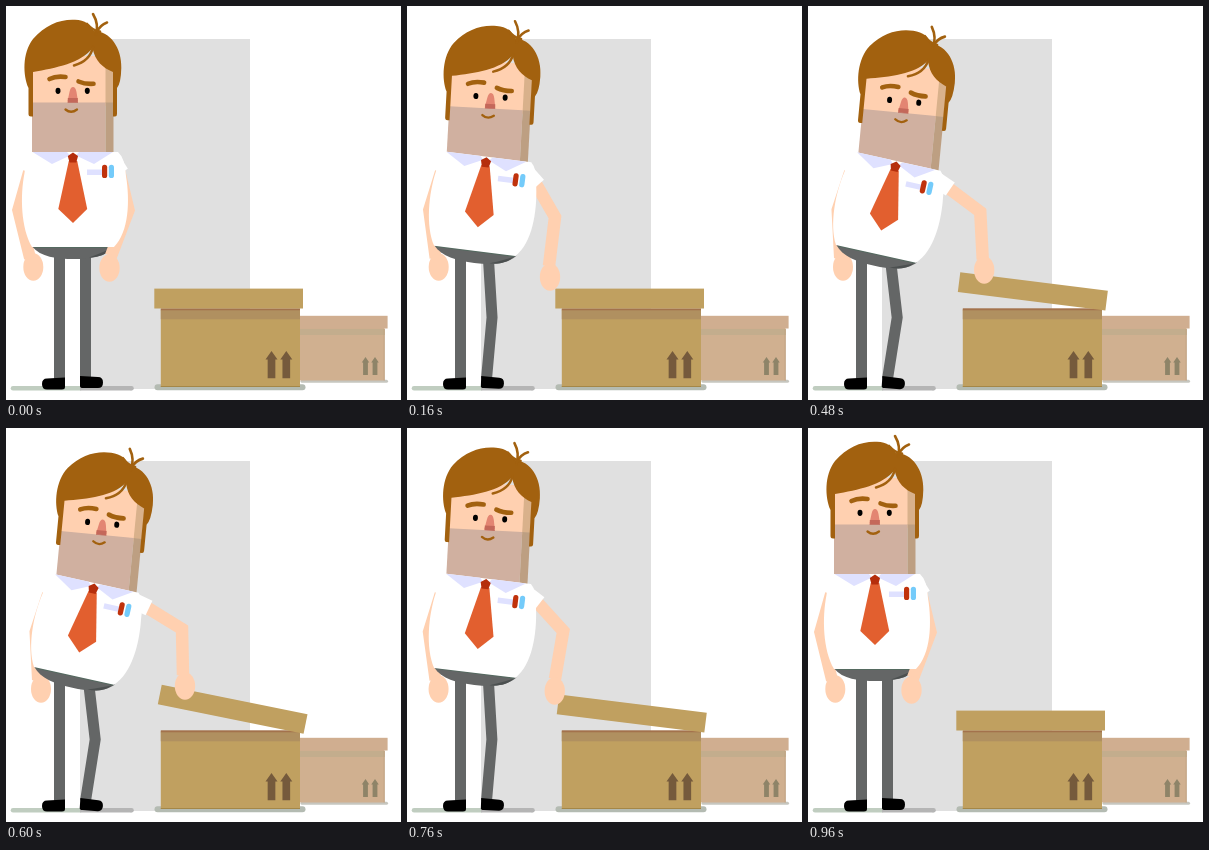
An HTML page with a canvas that plays this animation: 395x394 px, repeating every 1 s.

```html
<!DOCTYPE html>
<html lang="en">
<head>
<meta charset="utf-8">
<title>Opening the box</title>
<style>
html, body { margin: 0; width: 100%; height: 100%; overflow: hidden; background: #fff; }
canvas { display: block; width: 100vw; height: 100vh; }
</style>
</head>
<body>
<canvas id="stage"></canvas>
<script>
const W = 395, H = 394, LOOP = 1000, STEP = 40;
const SKIN = '#ffd0b0', HAIR = '#a2610f', CLOTH = '#646666', KRAFT = '#c0a060';
const canvas = document.getElementById('stage');
const ctx = canvas.getContext('2d');

// time, shoulder, elbow, wrist, hand
const ARM = [
  [0, 115, 167, 122.5, 204, 105, 250, 103.5, 262],
  [160, 131, 179, 148, 211, 142, 260, 143, 271],
  [280, 141, 188, 166, 214, 171, 264, 171.5, 274],
  [600, 143, 180, 176, 201, 177, 247, 179, 258],
  [680, 137, 178, 169, 201, 165, 250, 164.5, 261],
  [840, 128, 173, 143.5, 205, 131, 252, 131, 265],
  [960, 115, 167, 122.5, 204, 105, 250, 103.5, 262]
];

const mix = (a, b, k) => a + (b - a) * k;
const clamp = v => Math.min(1, Math.max(0, v));

function leanAt(t) {
  return t < 600 ? clamp(t / 280) : clamp(1 - (t - 600) / 360);
}

function lidAngle(t) {
  if (t < 600) return 11.4 * clamp((t - 280) / 320);
  return 11.4 * (1 - Math.pow(clamp((t - 600) / 280), 1.7));
}

function armAt(t) {
  if (t >= 960) return ARM[6].slice(1);
  const i = ARM.findIndex(row => row[0] > t) - 1;
  const a = ARM[i], b = ARM[i + 1], k = (t - a[0]) / (b[0] - a[0]);
  return a.map((v, j) => mix(v, b[j], k)).slice(1);
}

function rect(color, x0, y0, x1, y1) {
  ctx.fillStyle = color;
  ctx.fillRect(x0, y0, x1 - x0, y1 - y0);
}

function fill(color, d) {
  ctx.fillStyle = color;
  ctx.fill(new Path2D(d));
}

function stroke(color, width, d, cap = 'round') {
  ctx.strokeStyle = color;
  ctx.lineWidth = width;
  ctx.lineCap = cap;
  ctx.stroke(new Path2D(d));
}

function oval(color, x, y, rx, ry, turn = 0) {
  ctx.fillStyle = color;
  ctx.beginPath();
  ctx.ellipse(x, y, rx, ry, turn, 0, Math.PI * 2);
  ctx.fill();
}

// Rotates around (x, y) and moves that point by (dx, dy).
function posed(x, y, deg, dx, dy, draw) {
  ctx.save();
  ctx.translate(x + dx, y + dy);
  ctx.rotate(deg * Math.PI / 180);
  ctx.translate(-x, -y);
  draw();
  ctx.restore();
}

function arrow(color, x, top, bottom, w, head) {
  const s = w * 0.32;
  fill(color, `M${x} ${top}L${x + w / 2} ${top + head}H${x + s}V${bottom}H${x - s}V${top + head}H${x - w / 2}Z`);
}

function room() {
  rect('#fff', 0, 0, W, H);
  rect('#e0e0e0', 74, 33, 244, 383);
  stroke('#c0cdc0', 4.5, 'M7 382.2H74');
  stroke('#b5b5b5', 4.5, 'M74 382.2H125.5', 'butt');
  oval('#b5b5b5', 125.5, 382.2, 2.3, 2.25);
  stroke('#b4bbb2', 6, 'M151.5 381.3H296.5');
  stroke('#c6c6bf', 3, 'M296 375.3H380.5');
}

function boxes(angle) {
  rect('#d0b090', 292, 322, 378.5, 374.5);
  rect('#c3ad8d', 292, 323, 378.5, 329);
  rect('#b89a78', 377.8, 323, 378.6, 374.5);
  rect('#d0ae90', 292, 309.8, 381.6, 322.5);
  for (const x of [359.5, 369]) arrow('#8e8468', x, 351, 369, 7.5, 5.5);

  rect(KRAFT, 154.8, 303, 294, 381);
  rect('#b09060', 154.8, 304, 294, 313.3);
  rect('#a3724c', 154.8, 302.3, 294, 304.3);
  rect('#a48748', 154.8, 380, 294, 381);
  for (const x of [265.5, 280.3]) arrow('#755a3c', x, 345, 372.3, 12, 8.5);
  posed(297, 302.5, angle, angle * 0.05, angle * 0.28,
    () => rect(KRAFT, 148.3, 282.6, 297, 302.5));
}

function legs(p) {
  ctx.lineJoin = 'miter';
  rect(CLOTH, 48, 248, 59, 374);
  stroke(CLOTH, 11, `M${mix(79.5, 83, p)} ${mix(248, 258, p)}L${mix(79.5, 89.2, p)} 311.5L79.5 373`, 'butt');
  fill('#000', 'M59 371.5V381Q59 383.5 56 383.5H41Q36 383.5 36 378Q36 372.5 41 372.5Z');
  posed(75, 376, 4 * p, 0, 0, () =>
    fill('#000', 'M74 370V380Q74 382 77 382H92Q97 382 97 376.5Q97 371 92 371Z'));
}

function hips() {
  fill(CLOTH, 'M26 240.5H109C99 251 85 253 68 253C50 253 35 251 26 240.5Z');
  fill('#4c5050', 'M107 241.5C100 249 93 251 83 251.5Q98 246 107 241.5Z');
  rect('#556a60', 28, 240.5, 107, 242);
}

function farArm(p) {
  const hx = mix(27.3, 35, p);
  stroke(SKIN, 12, `M${mix(23, 42, p)} 166L${mix(12.2, 29.5, p)} 204L${mix(24, 32, p)} 252`, 'butt');
  oval(SKIN, hx, 261, 10, 13.8);
}

function nearArm([sx, sy, ex, ey, wx, wy, hx, hy], p) {
  const bx = mix(107, 126, p), by = mix(154, 172, p);
  stroke(SKIN, 12.5, `M${mix(bx, sx, .7)} ${mix(by, sy, .7)}L${ex} ${ey}L${wx} ${wy}`, 'butt');
  oval(SKIN, hx, hy, 10.2, 13.8);
  stroke('#fff', 16, `M${bx} ${by}L${sx} ${sy}`, 'butt');
}

function head() {
  rect(SKIN, 26, 50, 107, 100);
  rect('#d9b18b', 99.5, 50, 107.5, 97);
  fill('#e38572', 'M67 81Q69.5 81 70.5 86L72 95.5H61.5L63.5 86Q64.5 81 67 81Z');
  rect('#c4685a', 61.8, 92, 71.8, 96.5);
  rect('#d0b0a0', 26, 96.5, 99.5, 166);
  rect('#bd9f82', 99.5, 96.5, 107.5, 166);
  rect('#c06c60', 61.6, 96, 72, 96.8);

  fill(HAIR, 'M22.5 82C17 70 16 47 27 33C39 19 54 13 69 13.8C79 14 85 19 88 25' +
    'C104 25 116 42 115.3 62Q115 77 111 82V108Q111 110.5 109 110.5H107V66' +
    'C97 62 89 55 86.5 42C75 57 50 62 27 66V110.5H25Q22.5 110.5 22.5 108Z');
  stroke(HAIR, 2.5, 'M68 59.5Q84 55 87 41');
  stroke(HAIR, 2.6, 'M90 29Q93 18 87 8');
  stroke(HAIR, 2.6, 'M90 27Q94 19 101 16.5');
  stroke(HAIR, 2.6, 'M81 18Q87 25 94 25.5');

  stroke(HAIR, 4.6, 'M43.5 73Q50 69.8 59.5 71');
  stroke(HAIR, 4.6, 'M72.5 75.5Q79 78.3 87.5 77.8');
  oval('#000', 52, 84.8, 2.5, 3.1);
  oval('#000', 81.3, 84.8, 2.5, 3.1);
  stroke(HAIR, 2.3, 'M59.5 103.5Q65 108 71 103.5');
}

function shirt() {
  fill('#fff', 'M25 146H112Q119 152 120 170C124 195 123 226 108 241H26' +
    'C15 222 14 190 18.5 167Q20 152 25 146Z');
  fill('#dfe1ff', 'M26.5 146H61L64 149.5L46 158Z');
  fill('#dfe1ff', 'M70 149.5L73 146H107L88 158Z');
  fill('#e25f2f', 'M62.8 155H71.2L81.2 203L67 217L52.3 203Z');
  fill('#b52e0c', 'M67 146.5L72 150L70.3 156.5H63.5L61.8 150Z');
  rect('#dfe1ff', 81, 163.5, 97, 169);
  stroke('#c0320c', 5.2, 'M98.6 161.3V169.5');
  stroke('#74cbfa', 5.2, 'M105.4 161.3V169.5');
}

function draw(t) {
  const p = leanAt(t);
  const torso = part => posed(26, 241, 12.5 * p, 2 * p, -2 * p, part);
  room();
  legs(p);
  farArm(p);
  torso(hips);
  boxes(lidAngle(t));
  nearArm(armAt(t), p);
  posed(66.5, 85, 5.5 * p, 29.5 * p, 10.5 * p, head);
  torso(shirt);
}

function resize() {
  const dpr = window.devicePixelRatio || 1;
  canvas.width = Math.round(innerWidth * dpr);
  canvas.height = Math.round(innerHeight * dpr);
}

function tick() {
  const t = performance.now() % LOOP;
  ctx.setTransform(canvas.width / W, 0, 0, canvas.height / H, 0, 0);
  draw(Math.floor(t / STEP) * STEP);
  requestAnimationFrame(tick);
}

addEventListener('resize', resize);
resize();
tick();
</script>
</body>
</html>
```
